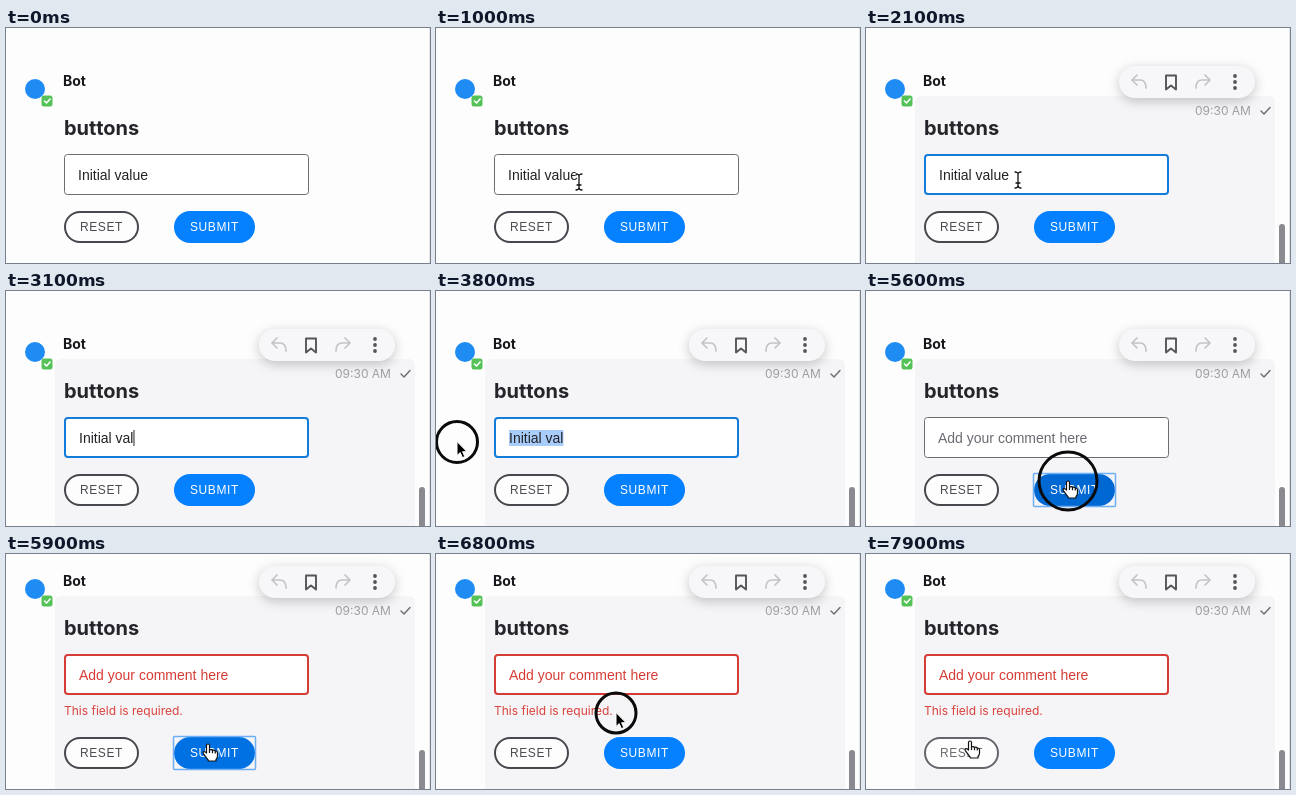
Recreate the animation shown at these times as an HTML page. Size 424 by 235 pixels, loop 8000 ms.

```html
<!DOCTYPE html>
<html lang="en">
<head>
<meta charset="utf-8">
<title>Form buttons</title>
<style>
html, body { margin: 0; width: 100%; height: 100%; overflow: hidden; background: #fefdfe; }
svg { display: block; width: 424px; height: 235px; }
text { font-family: Inter, "Open Sans", sans-serif; white-space: pre; }
.field, .btn { font-family: "Liberation Sans", Arial, sans-serif; }
.field { font-size: 14px; }
.btn { font-size: 12px; letter-spacing: .6px; }
.line { fill: none; stroke-linecap: round; stroke-linejoin: round; }
#panel { filter: drop-shadow(0 3px 6px rgba(0, 0, 0, .22)); }
</style>
</head>
<body>
<svg viewBox="0 0 424 235">
  <rect x="423" width="1" height="235" fill="#e6e5e8"/>
  <g id="message">
    <rect id="hover" x="49" y="68" width="360" height="230" rx="6" fill="#f5f4f6"/>
    <circle cx="29" cy="61" r="10" fill="#1f8cf3"/>
    <rect x="35.5" y="67.5" width="11" height="11" rx="2.5" fill="#55c258"/>
    <path class="line" d="M38.5 73l2 2 3.6-4" stroke="#fff" stroke-width="1.6"/>
    <text x="57" y="58" font-size="14" font-weight="700" fill="#17161a">Bot</text>
    <text x="58" y="107" font-size="20" font-weight="700" fill="#25242a">buttons</text>
    <g id="stamp">
      <text x="329" y="87" font-size="12" fill="#a09fa6">09:30 AM</text>
      <path class="line" d="M395 83l3 3 6-6.5" stroke="#6c6b72" stroke-width="1.4"/>
    </g>
    <g id="panel">
      <rect x="253" y="38" width="136" height="32" rx="16" fill="#f7f6f8"/>
      <g class="line" stroke="#c4c3c8" stroke-width="1.7">
        <path id="undo" d="M271 47l-5 5 5 5M266 52h8q6 0 6 8"/>
        <path d="M339 47l5 5-5 5M344 52h-8q-6 0-6 8"/>
      </g>
      <path class="line" d="M300 47.500h10v14l-5-4-5 4z" stroke="#55545b" stroke-width="1.900"/>
      <g fill="#55545b"><circle cx="369" cy="48" r="1.900"/><circle cx="369" cy="54" r="1.900"/><circle cx="369" cy="60" r="1.900"/></g>
    </g>
    <rect id="input" rx="3" fill="#fff"/>
    <rect id="selection" y="139" height="16" fill="#a9cdfa"/>
    <text id="value" class="field" y="152"></text>
    <rect id="caret" y="139" width="1" height="16" fill="#222"/>
    <text id="error" x="58" y="187" font-size="12" fill="#da423d">This field is required.</text>
  </g>
  <rect id="scrollbar" x="413" y="196" width="6" height="60" rx="3" fill="#8b8a90"/>
  <rect id="reset" x="59" y="184" width="73" height="30" rx="15" fill="#fefdfe" stroke-width="2"/>
  <text id="resetLabel" class="btn" x="74" y="203">RESET</text>
  <rect id="submit" x="168" y="183" width="81" height="32" rx="16"/>
  <rect id="outline" x="167.500" y="182.500" width="82" height="33" rx="1" fill="none" stroke="#6eaef5" stroke-width="1.500"/>
  <text class="btn" x="184" y="203" fill="#fff">SUBMIT</text>
  <circle id="ring" fill="none" stroke="#0a0a0a" stroke-width="3"/>
  <g id="cursor">
    <path id="arrow" d="M0-.5v14l3.200-2.900 2.200 5 2.400-1-2.200-4.900h4.400z" fill="#000" stroke="#fff"/>
    <g id="beam" class="line">
      <path d="M-3-8q3 0 3 2.500v11q0 2.500-3 2.500M3-8q-3 0-3 2.500v11q0 2.500 3 2.500M-2 3h4" stroke="#fff" stroke-width="3"/>
      <path d="M-3-8q3 0 3 2.500v11q0 2.500-3 2.500M3-8q-3 0-3 2.500v11q0 2.500 3 2.500M-2 3h4" stroke="#111" stroke-width="1.300"/>
    </g>
    <g id="hand" stroke="#111" stroke-width="1.200" stroke-linejoin="round">
      <path d="M-1.500 1.500a1.500 1.500 0 0 1 3 0v4.500q2-1 3 .4q2-.6 2.800.6q2-.2 2.200 1.600v3.400q0 2-1.500 3.500v1.500h-7.500q-.6-1.800-2-3.200l-3-4q-1-1.700.3-2.200q1.300-.3 2.700 1.400z" fill="#fff"/>
      <path d="M1.500 6v3M4.500 6.400v2.800M7.300 7v2.500" fill="none"/>
    </g>
  </g>
</svg>
<script>
const LOOP = 8000, STEP = 100;
const ui = {};
document.querySelectorAll('[id]').forEach(el => ui[el.id] = el);

// Pointer path: time, x, y
const path = [
  [400, 150, 230], [1000, 143, 154], [1200, 152, 152], [2600, 152, 152],
  [3300, 145, 151], [3800, 21, 151], [4000, 20, 151], [4300, 20, 151],
  [4400, 42, 155], [5200, 202, 190], [6200, 202, 190], [6600, 180, 159],
  [7000, 180, 159], [7700, 105, 188], [7900, 104, 187]
];

const within = (t, from, to) => t >= from && t < to;
const clamp = v => Math.max(0, Math.min(1, v));
const show = (el, on) => el.setAttribute('visibility', on ? 'visible' : 'hidden');
const set = (el, attrs) => { for (const k in attrs) el.setAttribute(k, attrs[k]); };

function pointerAt(t) {
  const i = path.findIndex(p => p[0] > t);
  if (i < 0) return path[path.length - 1].slice(1);
  if (i === 0) return path[0].slice(1);
  const [t0, x0, y0] = path[i - 1], [t1, x1, y1] = path[i];
  const k = (t - t0) / (t1 - t0), e = k * k * (3 - 2 * k);
  return [x0 + (x1 - x0) * e, y0 + (y1 - y0) * e];
}

function ringRadius(t) {
  if (within(t, 3300, 4000)) return 20.5;
  for (const [down, up] of [[5600, 5800], [6700, 7000]])
    if (within(t, down, up)) return t < down + STEP ? 29 : 20;
  return 0;
}

function drawField(t, failed, x) {
  const focused = within(t, 1600, 5600), empty = t >= 4200;
  const thick = focused || failed, w = thick ? 2 : 1, left = thick ? 73 : 72;
  set(ui.input, {
    x: 58 + w / 2, y: 126 + w / 2, width: 245 - w, height: 41 - w, 'stroke-width': w,
    stroke: failed ? '#d53c36' : focused ? '#137cdb' : '#6d6c73'
  });
  const typed = 'Initial value'.slice(0, t < 2700 ? 13 : t < 3000 ? 12 : 11);
  ui.value.textContent = empty ? 'Add your comment here' : typed;
  set(ui.value, { x: left, fill: failed ? '#d53c36' : empty ? '#6b6a72' : '#222126' });

  const width = n => n ? ui.value.getSubStringLength(0, n) : 0;
  const end = empty ? left : left + width(typed.length);
  const selecting = within(t, 3300, 4200);
  if (selecting) {
    let n = typed.length;
    while (n > 0 && left + (width(n) + width(n - 1)) / 2 > x) n--;
    const start = left + width(n);
    set(ui.selection, { x: start, width: end - start });
  }
  show(ui.selection, selecting);

  // The blink restarts after each edit
  const since = [1600, 2700, 3000, 4200].filter(s => s <= t).pop();
  set(ui.caret, { x: end });
  show(ui.caret, focused && !selecting && (t - since) % 1000 < 500);
}

function draw(t) {
  const [x, y] = pointerAt(t), failed = t >= 5800, dy = failed ? -26 : 0;
  const visible = t >= 400 && !within(t, 2600, 3300) && !within(t, 4200, 4400);
  const over = (l, top, r, b) => visible && x >= l && x < r && y >= top && y < b;
  const onInput = over(58, 126 + dy, 303, 167 + dy);
  const onReset = over(58, 183, 133, 215), onSubmit = over(168, 183, 249, 215);

  set(ui.message, { transform: `translate(0 ${dy})` });
  const fade = clamp((t - 1000) / 200);
  for (const el of [ui.hover, ui.scrollbar, ui.stamp]) set(el, { opacity: fade });
  set(ui.panel, { opacity: clamp((t - 1000) / 300) });
  drawField(t, failed, x);
  show(ui.error, failed);

  set(ui.reset, { stroke: onReset ? '#66656c' : '#48474d' });
  set(ui.resetLabel, { fill: onReset ? '#6c6b72' : '#4b4a50' });
  set(ui.submit, { fill: within(t, 5600, 5800) ? '#0068d2' : onSubmit ? '#0071e3' : '#0580ff' });
  show(ui.outline, within(t, 5600, 6700));

  const r = ringRadius(t);
  set(ui.ring, { cx: x, cy: y, r });
  show(ui.ring, r > 0);
  set(ui.cursor, { transform: `translate(${x} ${y})` });
  const hand = onReset || onSubmit;
  show(ui.beam, visible && onInput);
  show(ui.hand, visible && hand);
  show(ui.arrow, visible && !onInput && !hand);
}

function frame() {
  draw(Math.floor(performance.now() % LOOP / STEP) * STEP);
  requestAnimationFrame(frame);
}
frame();
</script>
</body>
</html>
```
